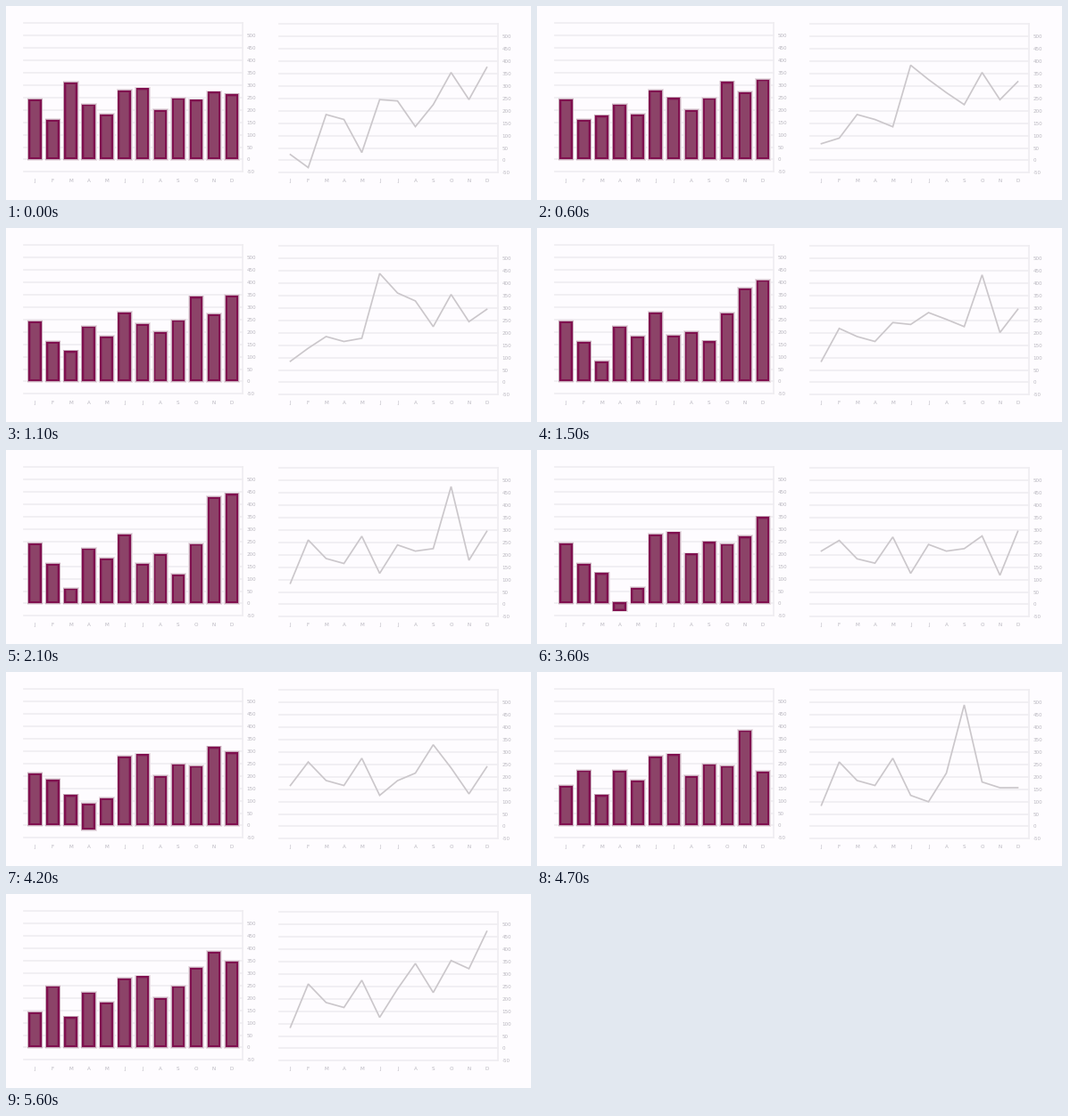
Animation, 588 px wide and 218 px high, one loop 5.7 s. Source, as a matplotlib script:

```python
import numpy as np
import matplotlib.pyplot as plt
from matplotlib.animation import FuncAnimation
from matplotlib.patches import Rectangle

W, H, DPI = 588, 218, 100
FRAMES, STEP = 57, 100
PX = 72 / DPI
ZERO, GAP = 172, 13.9    # baseline height, spacing of the 50-unit grid
FIRST, PERIOD, TAU = -415, 915, 80  # data updates and their settling time, ms

BG, GRID, TEXT, LINE = "#fefcff", "#efedf1", "#bab8c0", "#cbc7cb"
# Bar layers from the soft halo inwards: padding and colour
LAYERS = [(1.9, "#eadfe6"), (1.2, "#c6a9b9"), (0.3, "#80104f"),
          (-1.6, "#873060"), (-2.3, "#8c4368")]

# A typical year for each chart; each update names only the unusual months
BAR_YEAR = [241, 158, 120, 220, 180, 277, 285, 198, 245, 238, 270, 345]
LINE_YEAR = [80, 255, 180, 160, 270, 120, 235, 210, 220, 350, 240, 290]
UPDATES = [
    ({2: 310, 11: 260}, {0: 18, 1: -36, 4: 25, 5: 241, 7: 130, 11: 370}),
    ({6: 230, 9: 340}, {1: 133, 4: 173, 5: 435, 6: 356, 7: 324}),
    ({2: 58, 6: 158, 8: 115, 10: 428, 11: 440}, {9: 471, 10: 173}),
    ({3: 130, 7: 266, 8: 390, 10: 150, 11: 468},
     {1: 106, 2: 76, 3: 266, 4: 11, 6: 403, 9: 543, 10: 327}),
    ({3: -30, 4: 60}, {0: 212, 9: 268, 10: 110}),
    ({0: 158, 1: 220, 10: 382, 11: 216}, {6: 94, 8: 486, 9: 174, 10: 151, 11: 151}),
    ({0: 140, 1: 245, 9: 320, 10: 385}, {7: 338, 10: 317, 11: 468}),
]


def heights(year, unusual):
    values = [unusual.get(m, v) for m, v in enumerate(year)]
    return ZERO - np.array(values) * GAP / 50


def pose(bar_values, line_values):
    """Bar tops, bar bottoms and line points."""
    bar = heights(BAR_YEAR, bar_values)
    return np.array([np.minimum(bar, ZERO), np.maximum(bar, ZERO),
                     heights(LINE_YEAR, line_values)])


POSES = [pose(*u) for u in UPDATES]


def pose_at(ms):
    i, since = divmod(ms - FIRST, PERIOD)
    old, new = POSES[i - 1], POSES[i]
    return new + (old - new) * np.exp(-since / TAU)


fig = plt.figure(figsize=(W / DPI, H / DPI), dpi=DPI, facecolor=BG)
ax = fig.add_axes([0, 0, 1, 1])
ax.set_xlim(0, W)
ax.set_ylim(H, 0)
ax.axis("off")


def label(x, y, text, ha="left"):
    ax.text(x, y, text, color=TEXT, size=5.6 * PX, ha=ha,
            va="center_baseline", family="DejaVu Sans")


def draw_scale(left, top):
    right = left + 244.5
    for k in range(13):
        y = top + GAP * k
        ax.plot([left, right], [y, y], color=GRID, lw=1.7 * PX, zorder=1)
        if k:
            label(right + 5, y, str(550 - 50 * k))
    ax.plot([right, right], [top, top + 12 * GAP], color=GRID, lw=1.7 * PX, zorder=1)
    for i, month in enumerate("JFMAMJJASOND"):
        label(left + 12.5 + 20.05 * i, 195.5, month, "center")


draw_scale(20, 19.5)
draw_scale(306, 20.5)

bars = []
for i in range(12):
    x = 32.5 + 20.05 * i
    for pad, color in LAYERS:
        half = 7 + pad
        rect = Rectangle((x - half, ZERO), 2 * half, 0, fc=color, lw=0, zorder=3)
        ax.add_patch(rect)
        bars.append((rect, i, pad))

line, = ax.plot(318.5 + 20 * np.arange(12), np.full(12, ZERO), color=LINE,
                lw=1.7 * PX, solid_joinstyle="miter", zorder=3)


def update(n):
    high, low, trend = pose_at(n * STEP)
    for rect, i, pad in bars:
        rect.set_y(high[i] - pad)
        rect.set_height(max(low[i] - high[i] + 2 * pad, 0))
    line.set_ydata(trend)
    return [line] + [b[0] for b in bars]


anim = FuncAnimation(fig, update, frames=FRAMES, interval=STEP,
                     repeat=True, repeat_delay=0, blit=False)
plt.show()
```
